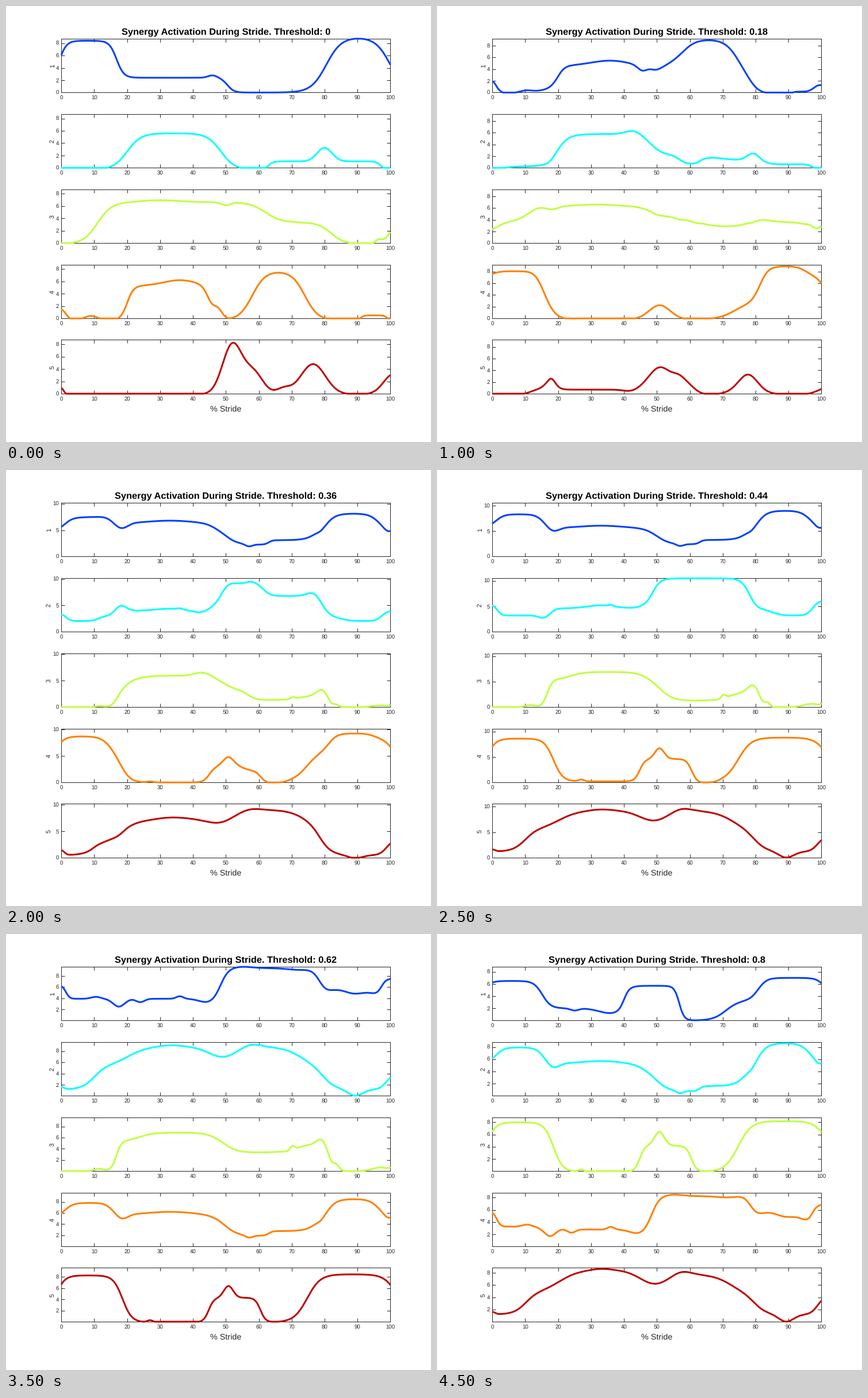
These frames come from a looping animation (739 px wide and 758 px high, 5 s). A matplotlib script:

```python
import numpy as np
import matplotlib.pyplot as plt
from matplotlib.animation import FuncAnimation

W, H, DPI = 739, 758, 100
PX = 72 / DPI
INK = "#262626"
COLORS = ["#0040ff", "#00ffff", "#bfff40", "#ff8000", "#bf0000"]
LEFT, RIGHT, TOP, BOTTOM, PITCH = 96.1, 668.45, 56.85, 150.45, 130.9
END = 150
X = np.linspace(0, 100, 801)

plt.rcParams["font.family"] = "Liberation Sans"
plt.rcParams["text.hinting"] = "none"


def bell(center, width):
    return np.exp(-((X - center) / width) ** 2)


def swell(start, stop, soft):
    """Smooth plateau of height 1 that eases in at start and out at stop."""
    return (np.tanh((X - start) / (2 * soft)) - np.tanh((X - stop) / (2 * soft))) / 2


def mix(a, b):
    return (a + b) / 2


# early stance and late swing
heel = (6 * swell(-.5, 16.8, 1.1) + 2.4 * swell(-20, 50.5, 1) + .4 * bell(46, 2)
        + 9 * swell(80.5, 100, 2.3))
heel_mid = (9.1 * swell(-4.5, 15.5, 1.7) + 3.1 * bell(50.7, 4.5) + 3.2 * swell(73.5, END, 2.5)
            + 6.8 * swell(81.3, 101, 1.3) - 1.4 * bell(98, 4) - .2)
heel_low = .82 * heel_mid + 1.6 * bell(14.5, 4) - .8 * bell(50, 4)
heel_wide = (4.5 * swell(-3.5, 15.2, 1.3) + 2 * swell(-20, 56.8, .7) + 3.7 * swell(40, 56.8, .8)
             - .8 * bell(36, 5) - .35 * bell(25, 1.8) + 3.3 * swell(71, END, 2)
             + 3.7 * swell(80.8, 101.5, 1.3))

# mid stance
stance = (5.9 * swell(20, 48.5, 2.1) + 1.35 * swell(63, 97, .7) + 2.2 * bell(80, 3.2)
          + .5 * bell(101, 1.5) - .3)
stance_high = (1.17 * stance + .8 * swell(4, 17, 1.5) + .8 * bell(67, 5) - bell(80, 3))
stance_step = (3.6 * swell(20, 56.8, 1.2) + 1.4 * swell(18.5, 81, .7) + 1.4 * bell(43, 3.5)
               - .6 * bell(51, 4) + .9 * bell(79, 2.2) + .6 * bell(101, 1))
stance_long = (5.4 * swell(16.7, 81.3, .8) + 1.5 * swell(24, 47, 2) - 2.05 * swell(50.3, 70, 1.8)
               - .7 * swell(68, 77, 1) + .7 * bell(70.2, 1) + .6 * bell(79, 1.8)
               + bell(83.5, 1.3) + .4 * bell(11.5, 2) + .65 * bell(97, 3.5) + .9 * bell(101, 1.2))
stance_short = stance_long - 2.1 * swell(52, 80, 2)

# long plateau
plateau = (3.3 * swell(11, 62, 2.4) + 3.5 * swell(11, 82, 2) + .3 * bell(30, 8)
           - .5 * bell(50, 2) + .7 * bell(96.5, 1.5) + 2.3 * bell(101, 2.5) - .15)
plateau_low = plateau - 1.3 * swell(19, 47, 2) - .7 * swell(62, 79, 2) + .5 * bell(6, 4)

# two humps with the larger one after mid stride
double = (5.6 * swell(20, 45, 1) + .9 * bell(36, 7) + 1.6 * bell(47.5, 2)
          + 8 * swell(58, 74, 2) + 1.7 * bell(0, 2) + .7 * bell(9, 3)
          + .8 * swell(91, 99, .5) - .3)
double_late = (double - 1.1 * swell(19, 46, .8) + 1.5 * swell(49, 75, 1.5)
               + 1.2 * bell(0, 3) + bell(99, 2))
double_full = (5.2 * swell(18.3, 78.5, 1.4) + .8 * bell(35, 9) + 4 * swell(51, 76, 2.3)
               + .9 * swell(9.5, 17, .8) + 1.4 * bell(0, 1.3) + 2.4 * bell(101, 3) - .2)

# push-off burst
burst = (8.1 * bell(52, 4.2) + 3.4 * bell(58.5, 4) + .9 * bell(67.5, 3) + 4.9 * bell(76.5, 5.3)
         + bell(0, 1) + 3.3 * bell(101, 4.3) - .1)
burst_low = (1.5 * bell(18, 1.4) + 5.2 * bell(51, 5) + 1.3 * bell(56.5, 2.5)
             + 4.3 * bell(77.5, 5) + 1.8 * bell(101, 3.5) - .15)
burst_wide = (1.6 * swell(11.5, 62, 1) + 2.3 * bell(17.5, 2.6) - .6 * bell(42, 3)
              + 2.4 * bell(51, 4.5) + 2.3 * bell(58, 3.5) + 2.45 * bell(77.8, 3.4)
              + .6 * bell(101, 1) - .05)

# high at both ends with a trough after mid stride
trough = (5.6 + 2.7 * swell(1, 15.5, 1.3) - .8 * bell(18.5, 2.5) + .45 * bell(33, 9)
          - 3.2 * swell(50, 78.5, 1.9) - .4 * bell(57, 1.5) + .85 * swell(63, 78, .6)
          + 3.4 * swell(80.5, 96.5, 1.5) - .4 * bell(99, 1.5))
trough_first = (trough - .3 - 1.4 * (swell(-9, 14, 2) + swell(81, 109, 1.5))
                + 1.8 * swell(18, 46, 1.5))
trough_even = trough - .5 + .65 * swell(17, 47, 2)
trough_low = trough - .3 - .55 * swell(48, 78, 2)
trough_deep = trough - .35 - 1.3 * swell(46, 77, 2)

# late stance block
block = (3.2 + 1.9 * bell(0, 2) - .5 * bell(15.5, 2) + 1.4 * swell(18, 47, .8)
         + .6 * bell(33, 6) + .25 * bell(36, 1) + 7.3 * swell(48.2, 78.3, 1.3)
         + .9 * bell(82.5, 4) + 2.9 * swell(97.3, END, .9))
block_flat = (3.9 + 2.2 * bell(0, 1.8) + .35 * bell(10.5, 2) - 1.4 * bell(17.5, 2.5)
              - .6 * bell(24, 1.8) + .45 * bell(36, 1.5) - .7 * bell(44.5, 3.5)
              + 5.5 * swell(48.5, 78.5, 1.2) + .25 * bell(55, 4) - .3 * bell(72, 5)
              + 1.5 * bell(84, 5) + bell(93, 4) + 3.6 * swell(97.2, END, .8))
block_low = block_flat - .65 - .5 * swell(20, 76, 3) + .75 * swell(78, 93, 1.5)

# three separate lobes
lobes = (8.4 * swell(-2, 18.6, 1.4) + .35 * bell(27, 1.2) + 4.4 * swell(44.8, 60.5, .8)
         + 2.1 * bell(50.8, 2) + 8.6 * swell(74.7, 102.5, 2) - .1)
lobes_high = lobes + .3 - .3 * swell(62, 69, .5)
lobes_low = .965 * lobes + .3 * swell(47, 53, 1)

# broad arch
arch = (1.2 + 4.5 * swell(10, 79.5, 1.9) + 3.5 * swell(20.5, 72.5, 2.8) + .3 * bell(33, 5)
        - 1.9 * bell(49, 6) + .6 * bell(57.5, 4) - 1.2 * bell(89.3, 3.2)
        + .4 * bell(0, 1.2) + 2.5 * bell(101, 3))
arch_low = .912 * arch - .15 * swell(8, 52, 2)
arch_tilted = arch - .8 * swell(9, 79, 2) - .65 * swell(50, 77, 3)

# (upper limit, five curves) per threshold
STEPS = [
    (8.73, [heel, stance, plateau, double, burst]),
    (8.86, [stance_high, burst_low, plateau_low, double_late, heel_low]),
    (9.2, [mix(double_late, double_full), mix(stance_high, stance_step),
           mix(plateau_low, trough_first), mix(heel_low, heel_mid),
           mix(burst_low, burst_wide)]),
    (10.02, [double_full, stance_step, trough_first, heel_mid, burst_wide]),
    (10.2, [mix(trough_first, trough), 1.3 * mix(burst_wide, block),
            mix(stance_step, stance_short), mix(heel_mid, lobes_high),
            mix(double_full, arch)]),
    (10.56, [trough, block, stance_short, lobes_high, arch]),
    (10.1, [mix(block, block_flat), .98 * arch, mix(stance_short, stance_long),
            mix(trough, trough_even), mix(lobes_high, lobes)]),
    (9.65, [block_flat, .957 * arch, stance_long, trough_even, lobes]),
    (8.74, [1.035 * stance_long, lobes, arch_low, block_low, trough_low]),
    (8.83, [heel_wide, trough_deep, lobes_low, block_low, arch_tilted]),
]

fig = plt.figure(figsize=(W / DPI, H / DPI), dpi=DPI, facecolor="white")


def label(x, y, text, size, **style):
    style = {"ha": "center", "va": "baseline", "color": INK} | style
    return fig.text(x / W, 1 - y / H, text, fontsize=size * PX, **style)


axes, lines, names = [], [], []
for i, color in enumerate(COLORS):
    ax = fig.add_axes([LEFT / W, 1 - (BOTTOM + PITCH * i) / H,
                       (RIGHT - LEFT) / W, (BOTTOM - TOP) / H])
    ax.set_xlim(0, 100)
    ax.set_xticks(range(0, 101, 10))
    ax.tick_params(direction="in", top=True, right=True, length=5.7 * PX, width=PX,
                   color=INK, labelcolor=INK, labelsize=9.7 * PX)
    ax.tick_params(axis="x", pad=5.5 * PX)
    ax.tick_params(axis="y", pad=4 * PX)
    for spine in ax.spines.values():
        spine.set(linewidth=PX, edgecolor=INK)
    lines += ax.plot(X, 0 * X, color=color, lw=3 * PX, clip_on=False, zorder=3,
                     solid_joinstyle="round", solid_capstyle="butt")
    names.append(label(81, 104 + PITCH * i, str(i + 1), 10.7, rotation=90, va="center"))
    axes.append(ax)

title = label(382.5, 50, "", 16.4, weight="bold", color="black")
label(382.5, 705, "% Stride", 14.4)


def draw(n):
    top, curves = STEPS[n]
    wide = top >= 10
    ticks = [0, 5, 10] if wide else [0, 2, 4, 6, 8]
    if n > 6:
        ticks = ticks[1:]
    for ax, line, name, ys in zip(axes, lines, names, curves):
        ax.set_ylim(0, top)
        ax.set_yticks(ticks)
        line.set_ydata(np.clip(ys, 0, top))
        name.set_x((75 if wide else 81) / W)
    title.set_text(f"Synergy Activation During Stride. Threshold: {round(0.8 * n / 9, 2):g}")
    return lines + names + [title]


anim = FuncAnimation(fig, draw, frames=len(STEPS), init_func=lambda: draw(0),
                     interval=500, repeat=True, repeat_delay=0)
plt.show()
```
